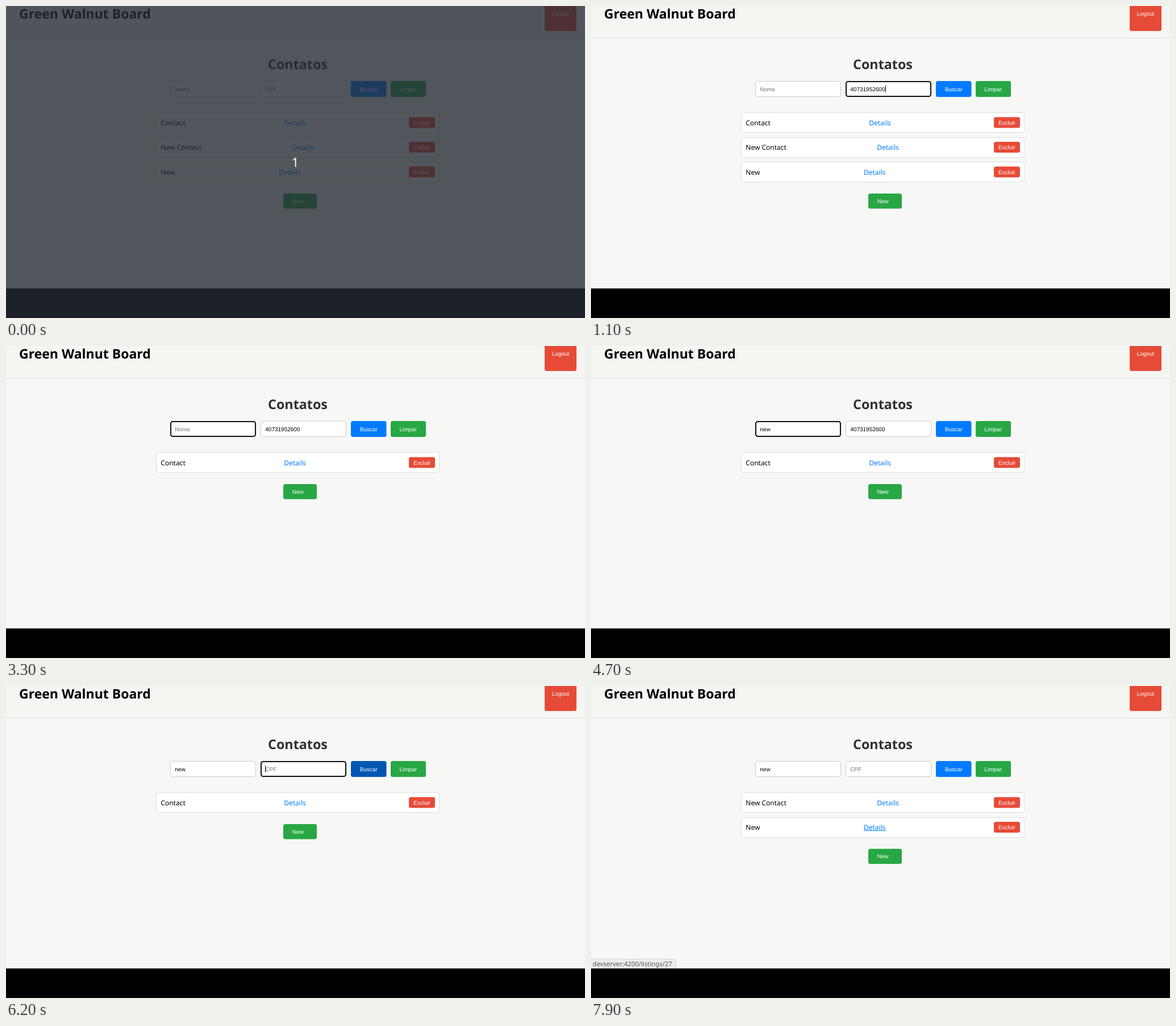
Write an HTML page that moves like this. It is 1019 px wide and 549 px high and loops after 8 s.

```html
<!DOCTYPE html>
<html lang="pt">
<head>
<meta charset="utf-8">
<title>Contatos</title>
<style>
  html, body { margin: 0; width: 100%; height: 100%; overflow: hidden; background: #000; }
  svg { display: block; width: 100%; height: 100%; }
  text { font: 12px "Noto Sans", sans-serif; text-rendering: geometricPrecision; white-space: pre; }
  .ui { font: 10px "Liberation Sans", Arial, sans-serif; }
  .mid { text-anchor: middle; }
  .brand { font-size: 23px; font-weight: 700; }
  .heading { font-size: 23.3px; font-weight: 700; }
  .status { font-size: 11.3px; }
  .count { font-size: 22px; }
</style>
</head>
<body>
<svg id="stage" viewBox="0 0 1019 549"></svg>
<script>
const LOOP = 8000;
const RED = '#e64b37', BLUE = '#007bff', DARK_BLUE = '#0056b3', GREEN = '#28a745';
const FIELD = '#fffffd', INK = '#000';
const ROW_TOP = 187.3, ROW_PITCH = 43.5;
const CPF = '40731952600';

const contact = { name: 'Contact', linkX: 489.2 };
const newContact = { name: 'New Contact', linkX: 503.2 };
const newOne = { name: 'New', linkX: 480 };

const rect = (x, y, w, h, fill, extra = '') =>
  `<rect x="${x}" y="${y}" width="${w}" height="${h}" fill="${fill}" ${extra}/>`;

const label = (x, y, text, fill, style = '') =>
  `<text x="${x}" y="${y}" fill="${fill}" class="${style}">${text}</text>`;

const outlined = (x, y, w, h, stroke, line) =>
  rect(x + line / 2, y + line / 2, w - line, h - line, FIELD,
    `rx="3.5" stroke="${stroke}" stroke-width="${line}"`);

const button = (x, y, w, h, fill, text, textX, baseline) =>
  rect(x, y, w, h, fill, 'rx="3.5"') + label(textX, baseline, text, '#fff', 'ui mid');

function field(x, hint, { value, focused, caretX, selected }) {
  const textX = x + 8.3;
  return (focused ? outlined(x, 132, 151, 28, '#101010', 2) : outlined(x, 132, 151, 28, '#ccc', 1)) +
    (selected ? rect(textX, 140, 61.3, 12, '#3367d1') : '') +
    label(textX, 149.5, value || hint, selected ? '#fff' : value ? INK : '#757575', 'ui') +
    (caretX ? rect(caretX, 140, 1, 12, INK) : '');
}

function row({ name, linkX }, index, underlined) {
  const shift = index * ROW_PITCH, baseline = 209.8 + shift;
  return outlined(264, Math.round(ROW_TOP + shift), 499, 36, '#ddd', 1) +
    label(272.3, baseline, name, INK) +
    label(linkX, baseline, 'Details', BLUE) +
    (underlined ? rect(480, 254, 39, 1, BLUE) : '') +
    button(709, 195.5 + shift, 46, 19, RED, 'Excluir', 732, 208.8 + shift);
}

function scene(t) {
  const during = (...spans) => spans.some(([from, to]) => t >= from && t < to);

  const typed = [3700, 3900, 4100].filter(time => t >= time).length;
  const nameField = {
    value: 'new'.slice(0, typed),
    focused: during([2700, 5200]),
    caretX: during([2700, 3300], [3700, 4700]) && [297, 302, 308, 315][typed]
  };

  const filled = during([1100, 5900]);
  const cpfField = {
    value: filled ? CPF : '',
    focused: during([400, 1800], [5200, 6400]),
    caretX: during([400, 1000], [1100, 1700], [5200, 5400], [5900, 6400]) && (filled ? 518 : 456),
    selected: during([5400, 5900])
  };

  const searchColor = during([1500, 2200], [6200, 7000]) ? DARK_BLUE : BLUE;
  const rows = t < 1900 ? [contact, newContact, newOne]
    : t < 6500 ? [contact] : [newContact, newOne];
  const newTop = 199.5 + rows.length * ROW_PITCH;

  return rect(0, 0, 1019, 497, '#f7f7f6') +
    rect(0, 0, 1019, 56, '#f5f5f2') +
    rect(0, 56, 1019, 1, '#ddd') +
    label(23, 22, 'Green Walnut Board', INK, 'brand') +
    button(948, -10, 56, 54, RED, 'Logout', 976, 17) +
    label(513.5, 111, 'Contatos', '#2f2f2f', 'heading mid') +
    field(289, 'Nome', nameField) +
    field(448, 'CPF', cpfField) +
    button(607, 132, 62.5, 28, searchColor, 'Buscar', 638.2, 149.5) +
    button(677, 132, 62, 28, GREEN, 'Limpar', 707.7, 149.5) +
    rows.map((item, i) => row(item, i, item === newOne && t >= 7600)).join('') +
    button(488, newTop, 59, 26.5, GREEN, 'New', 513.7, newTop + 16.7) +
    (t >= 7900 ? statusBar() : '') +
    rect(0, 497, 1019, 52, '#000') +
    (t < 100 ? countdown() : '');
}

const statusBar = () =>
  '<path d="M-1 480.5H146.500q3 0 3 3V498H-1z" fill="#ececec" stroke="#d6d6d6"/>' +
  label(3, 493, 'devserver:4200/listings/27', '#555', 'status');

const countdown = () =>
  rect(0, 0, 1019, 549, '#262a33', 'opacity=".79"') + label(509, 282.5, '1', '#fff', 'count mid');

const stage = document.getElementById('stage');
let shown = '';

function draw() {
  const markup = scene(performance.now() % LOOP);
  if (markup !== shown) stage.innerHTML = shown = markup;
  requestAnimationFrame(draw);
}
draw();
</script>
</body>
</html>
```
